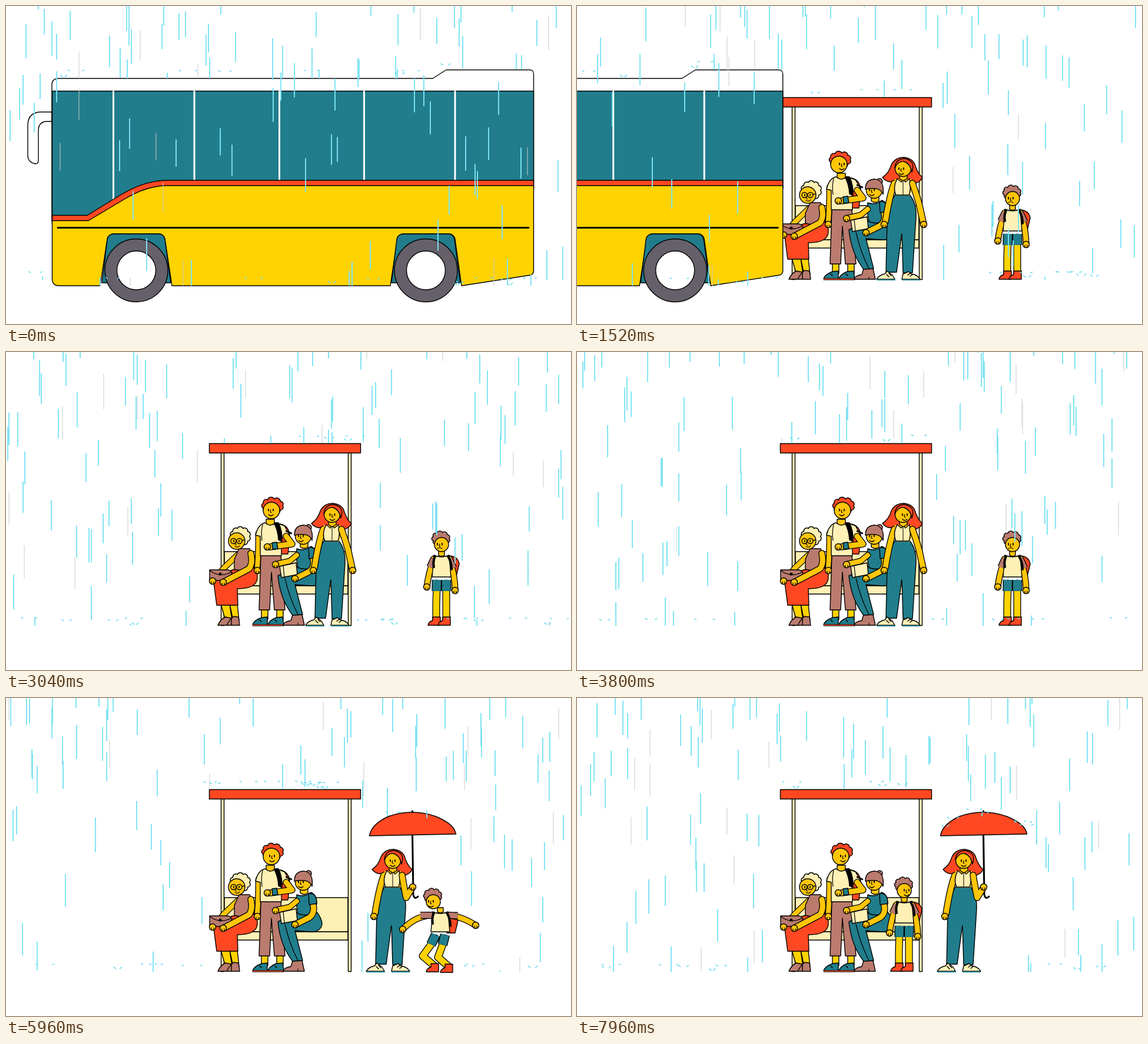
Write an HTML page that moves like this. It is 960x540 px and loops after 8 s.

```html
<!DOCTYPE html>
<html lang="en">
<head>
<meta charset="utf-8">
<title>Bus stop in the rain</title>
<style>
  html, body { margin: 0; width: 100%; height: 100%; overflow: hidden; background: #fff; }
  svg { display: block; width: 100%; height: 100%; }
</style>
</head>
<body>
<svg viewBox="0 0 960 540" stroke="#000" stroke-width="1.4" stroke-linejoin="round">
  <g id="shelter"></g>
  <g id="granny"></g>
  <g id="teen"></g>
  <g id="teenHead"></g>
  <g id="reader"></g>
  <g id="mother"></g>
  <g id="boy"></g>
  <g id="bus"></g>
  <g fill="none">
    <path id="thin" stroke="#c8cccd" stroke-width="1"/>
    <path id="drops" stroke="#7de3f4" stroke-width="1.9"/>
    <path id="splashes" stroke="#62d9ed" stroke-width="1.4"/>
  </g>
</svg>
<script>
const RED = '#ff4822', TEAL = '#217d8c', YELLOW = '#ffd300', SKIN = '#ffc608',
      CREAM = '#fff0b5', MAUVE = '#ba7b6e', GREY = '#65606a';
const $ = id => document.getElementById(id);
const LOOP = 8000;

// ---------- drawing helpers ----------
const shape = (d, fill = 'none', extra = '') => `<path d="${d}" fill="${fill}" ${extra}/>`;
const line = (d, width = 1.5, color = '#000') =>
  shape(d, 'none', `stroke="${color}" stroke-width="${width}" stroke-linecap="round"`);
const disc = (x, y, r, fill) => `<circle cx="${x}" cy="${y}" r="${r}" fill="${fill}"/>`;
const box = (x, y, w, h, fill) => shape(`M${x} ${y}h${w}v${h}h${-w}z`, fill);
const group = (transform, content) => `<g transform="${transform}">${content}</g>`;

const limb = (d, width, color, cap = 'round') => [[width + 2.6, '#000'], [width, color]]
  .map(([w, c]) => shape(d, 'none', `stroke="${c}" stroke-width="${w}" stroke-linecap="${cap}"`)).join('');
const hand = (x, y) => disc(x, y, 5.5, SKIN) + line(`M${x - 2} ${y + 1}v4m4 -4v4`, 1.2);

function curls(cx, cy, rx, ry, n, fill) {
  const at = i => {
    const a = i / n * 2 * Math.PI;
    return [cx + rx * Math.cos(a), cy + ry * Math.sin(a)];
  };
  let d = 'M' + at(0);
  for (let i = 1; i <= n; i++) {
    const [x, y] = at(i), [px, py] = at(i - 1);
    const r = Math.hypot(x - px, y - py) * .54;
    d += `A${r} ${r} 0 0 1 ${x} ${y}`;
  }
  return shape(d + 'Z', fill);
}

function face(x, y, look, mouth) {
  const f = x + look;
  return line(`M${f - 4} ${y - 3}v2.5m8 -2.5v2.5`, 1.8) +
    line(`M${f} ${y - 2}q-2 5 1 4.500M${f - 4} ${y + 6}q4 ${mouth} 8 0`, 1.2);
}

// ---------- timing helpers ----------
const ease = (t, from, to) => {
  const p = Math.min(1, Math.max(0, (t - from) / (to - from)));
  return p * p * (3 - 2 * p);
};
const mix = (a, b, p) => a + (b - a) * p;
const random = n => {
  const v = Math.sin(n * 127.1 + 11.7) * 43758.5453;
  return v - Math.floor(v);
};

// ---------- still parts ----------
$('shelter').innerHTML =
  box(371, 339, 210, 58, CREAM) + box(371, 397, 210, 14, CREAM) +
  box(365.5, 171, 5, 293.5, CREAM) + box(581.5, 171, 5, 293.5, CREAM) +
  box(345.5, 155.5, 257, 16, RED);

$('granny').innerHTML =
  shape('M365 428L373 456H384L380 428ZM380 428L386 456H396L393 428Z', YELLOW) +
  shape('M360 464Q364 454 373 450L383 452V464ZM375 464Q380 454 387 449L395 450L397 464Z', MAUVE) +
  limb('M394 344L370 367L352 389', 8, SKIN) +
  shape('M385 370Q352 380 353 392L358 430H394L393 402Q426 402 427 384Q428 370 420 366Z', RED) +
  shape('M396 334L388 352L388 369Q402 374 422 365Q423 350 414 334Z', MAUVE) +
  shape('M346 370H378L384 374Q381 388 362 388L346 387Z', MAUVE) +
  line('M346 371Q364 384 382 374', 1.2) + disc(364, 377, 1.8, '#000') +
  limb('M416 342Q420 358 413 368L371 390', 9, SKIN) + hand(369, 391) + hand(351, 389) +
  curls(398, 313, 15.5, 14, 10, CREAM) + disc(392, 321, 14, SKIN) +
  shape('M391 321a4.500 4.500 0 1 1 -9 0a4.500 4.500 0 1 1 9 0M401 321a4.500 4.500 0 1 1 -9 0a4.500 4.500 0 1 1 9 0M401 320L405 319') +
  line('M387 320v2M396 320v2', 1.8) + line('M391 323q-3 5 1 5M389 330q5 3 8 -1', 1.2);

$('teen').innerHTML =
  shape('M466 292Q483 296 482 316L479 343H464Z', RED) +
  box(434, 436, 11, 18, YELLOW) + box(460, 436, 11, 18, YELLOW) +
  shape('M433 345H467L474 438H456L451 374L448 438H430Z', MAUVE) +
  shape('M419 463Q421 456 434 451L444 450V463ZM445 463Q447 456 459 451L470 450L472 463Z', TEAL) +
  line('M420 464H472', 2, RED) + line('M419 465H472', 1) +
  line('M431 455l3 3m23 -3l3 3', 1.5) +
  limb('M429 308Q429 340 427 365', 8, SKIN) + hand(427, 371) +
  shape('M440 290Q449 297 459 290L473 295L481 309L468 316V346H432V313L424 311Q428 293 440 290Z', CREAM) +
  shape('M455 290L463 290Q470 304 469 322L463 319Q462 302 455 290Z', '#000') +
  line('M436 293Q433 306 435 320', 1.2) + line('M476 304l9 4', 2.5) +
  limb('M476 313L486 326L449 331', 9, SKIN) +
  shape('M452 324L460 323L462 334L453 335Z', TEAL) + hand(444, 331) +
  shape('M442 284H456V291Q449 297 442 291Z', SKIN);

$('reader').innerHTML =
  shape('M471 464Q472 458 484 456L487 446H503L507 464Z', MAUVE) + line('M496 464v-4', 1.2) +
  shape('M497 363L526 361Q537 374 537 384Q535 397 518 397L491 395L504 446L487 447Q466 420 462 380Z', TEAL) +
  line('M474 384Q481 416 496 446', 1.2) +
  shape('M494 334Q506 339 518 330Q528 334 528 348L525 364Q510 372 496 366L493 348Z', TEAL) +
  limb('M494 345L482 355L460 360', 8, SKIN) + hand(458, 361) +
  shape('M465 364L493 358L495 378L468 383Z', CREAM) + line('M471 363l2 19', 1.2) +
  limb('M522 352Q525 366 515 373L493 384', 9, SKIN) + hand(491, 385) +
  shape('M514 332Q528 330 528 349L515 351Z', TEAL) +
  shape('M500 324H513V331Q506 336 500 331Z', SKIN) +
  disc(514, 298, 5, MAUVE) + disc(505, 313, 13.5, SKIN) +
  shape('M490 311Q490 295 505 294Q523 295 520 320Q516 306 490 311Z', MAUVE) +
  face(506, 314, -5, 4);

const wheel = shape('M163 470L172 396Q174 387 184 387H259Q268 387 270 396L280 470Z', TEAL) +
  disc(221.5, 449, 53.5, GREY) + disc(221.5, 449, 33, '#fff');
$('bus').innerHTML =
  shape('M78 180H60Q37 180 37 203V255Q38 266 50 268Q55 268 55 262V212Q55 196 70 196H78Z', '#fff') +
  shape('M78 366V134Q78 123 90 123H725L748 108.500H889Q896.500 108 896.500 116V310Z', '#fff') +
  shape('M78.500 144.500H896.500V300H270L140 360H78.500Z', TEAL) +
  line('M182.500 145V328M320 145V296M464.500 145V296M608.500 145V296M763 145V296', 3, '#fff') +
  shape('M78.500 355.500H138L196 320Q234 297 272 296H896.500V310L140 370H78.500Z', RED) +
  shape('M78.500 364.500H140L203 327Q238 306 272 305H896.500V450Q896 456 891 457L774 475' +
    'L763 396Q761 387 752 387H676Q667 387 665 396L653 475H282L270 396Q268 387 259 387' +
    'H184Q174 387 172 396L160 475H90Q78.500 475 78.500 463Z', YELLOW) +
  line('M88 376.500H888', 2.8) + wheel + group('translate(492 0)', wheel);

// ---------- moving people ----------
function drawTeenHead(t) {
  const turn = ease(t, 1600, 2200), back = ease(t, 7000, 7500);
  const look = 5 - 6 * turn + 2 * ease(t, 4800, 5400) + 3 * back;
  return group(`translate(${-6 + 6 * turn - 3 * back} 0)`,
    curls(453, 261, 17, 11.5, 9, RED) + disc(451, 269, 14, SKIN) + face(451, 270, look, 4));
}

function drawUmbrella(t) {
  const open = mix(.08, 1.04, ease(t, 4350, 4650)) - .04 * ease(t, 4720, 5000);
  return line('M690.500 192V230L692 334Q694 343 700 337', 3) +
    group(`translate(691 0) scale(${open} 1) translate(-691 0)`,
      shape('M617.500 234Q621 214 650 201Q690 187 730 201Q762 214 764.500 231Z', RED));
}

function drawMother(t) {
  const walk = ease(t, 3850, 4600), raise = ease(t, 4050, 4400);
  const swing = 13 * Math.sin(walk * 4 * Math.PI);
  const look = -3 + 6 * ease(t, 2600, 3400) - 3 * ease(t, 4800, 5400);
  const handX = mix(589, 588, raise), handY = mix(371, 321, raise);
  const leftLeg = shape('M541 320Q529 336 527 364L525 452H543L552 385', TEAL) +
    shape('M509 464Q513 457 523 455L527 450L536 457L540 464Z', CREAM);
  const rightLeg = shape('M565 320Q577 335 576 358L570 453H554L552 385', TEAL) +
    shape('M583 464Q578 456 568 455L563 451L554 455L552 464Z', CREAM);
  return group(`translate(${103 * walk} ${-Math.abs(swing) * .15})`,
    group(`rotate(${swing} 552 345)`, leftLeg + line('M510 465H540', 2, TEAL) + line('M526 456l4 4m0 -6l4 4')) +
    group(`rotate(${-swing} 552 345)`, rightLeg + line('M553 465H582', 2, TEAL) + line('M562 457l4 -3m0 5l4 -3')) +
    shape('M541.500 320H565L568 345L552 388L540 345Z', TEAL, 'stroke="none"') +
    shape('M519 291Q530 284 534 270Q540 257 556 257Q572 259 575 272Q580 286 587 291Q584 299 572 302L540 297Q528 302 519 291Z', RED) +
    limb('M539 301Q531 322 524 366', 9, SKIN) + hand(522, 371) +
    shape('M540 294H568V308Q570 314 565 322H543Q536 310 540 294Z', SKIN, 'stroke="none"') +
    shape('M544 293L551 299L554 294L558 299L565 293Q568 312 564 321H542Q536 309 544 293Z', CREAM) +
    line('M554 296V320', 1) +
    (raise > .3 ? group('translate(-103 0)', drawUmbrella(t)) : '') +
    limb(`M570 301Q${mix(576, 574, raise)} ${mix(318, 325, raise)} ${mix(581, 577, raise)} ${mix(335, 339, raise)}L${handX} ${handY}`, 9, SKIN) +
    hand(handX, handY) +
    shape('M548 288H561V293L554 297L548 293Z', SKIN) + disc(554, 276, 13.5, SKIN) +
    shape('M540 275Q546 263 555 264Q566 267 569 282Q576 262 556 259Q541 260 540 275Z', RED) +
    face(554, 278, look, 4));
}

// neck, head, hip, elbow + hand (left, right), knee + foot (left, right), look, mouth
const STAND = [740,345, 740,327, 740,393, 718,375, 715,399, 763,378, 763,405, 731,430, 731,458, 748,430, 748,458, -3,-3];
const GLAD = [...STAND.slice(0, 22), -4, 4];
const CROUCH = [738,363, 726,346, 738,408, 697,369, 674,393, 773,370, 798,386, 708,438, 728,459, 734,440, 752,460, -4,4];
const LEAP = [740,340, 738,321, 740,390, 705,345, 690,318, 775,345, 790,318, 722,412, 735,440, 745,415, 758,440, -2,5];
const ARRIVED = [...STAND.slice(0, 22), 4, 4];
const BOY_KEYS = [[0, STAND], [4850, STAND], [5200, GLAD], [5500, GLAD], [5900, CROUCH], [6080, CROUCH],
  [6380, LEAP], [6740, CROUCH], [7150, ARRIVED], [LOOP, ARRIVED]];

function boyPose(t) {
  const i = BOY_KEYS.findIndex(([time]) => time > t);
  const [from, a] = BOY_KEYS[i - 1], [to, b] = BOY_KEYS[i];
  const p = ease(t, from, to);
  return a.map((v, k) => mix(v, b[k], p));
}

function drawBoy(t) {
  const [nx, ny, hx, hy, px, py, elx, ely, hlx, hly, erx, ery, hrx, hry,
    klx, kly, flx, fly, krx, kry, frx, fry, look, mouth] = boyPose(t);
  const hop = Math.min(1, Math.max(0, (t - 6080) / 660));
  const arm = (side, ex, ey, x, y) => {
    const sx = nx + 13 * side, sy = ny + 6;
    return limb(`M${sx} ${sy}Q${ex} ${ey} ${x} ${y}`, 8.5, SKIN) + hand(x, y) +
      limb(`M${sx} ${sy}L${mix(sx, ex, .75)} ${mix(sy, ey, .6)}`, 9.5, MAUVE, 'butt');
  };
  const leg = (side, kx, ky, x, y) => {
    const sx = px + 8 * side;
    return limb(`M${sx} ${py}L${kx} ${ky}L${x} ${y - 4}`, 10.5, YELLOW) +
      shape(`M${x - 6} ${y - 8}h13v14h-21q1 -6 8 -8z`, RED) +
      limb(`M${sx} ${py - 6}L${mix(sx, kx, .35)} ${mix(py, ky, .35)}`, 14, TEAL, 'butt');
  };
  return group(`translate(${-184 * ease(hop, 0, 1)} ${-50 * 4 * hop * (1 - hop)})`,
    shape(`M${nx + 10} ${ny + 1}q18 0 20 14l-5 21h-14z`, RED) +
    leg(-1, klx, kly, flx, fly) + leg(1, krx, kry, frx, fry) +
    arm(-1, elx, ely, hlx, hly) + arm(1, erx, ery, hrx, hry) +
    shape(`M${nx - 13} ${ny}Q${nx} ${ny + 6} ${nx + 13} ${ny}L${px + 16} ${py - 11}H${px - 16}Z`, CREAM) +
    line(`M${nx - 11} ${ny + 2}q-4 9 -2 18M${nx + 11} ${ny + 2}q6 9 6 22`, 4) +
    shape(`M${nx - 5} ${ny - 7}h10v7q-5 4 -10 0z`, SKIN) +
    curls(hx - 1, hy - 10, 14, 10.5, 9, MAUVE) + disc(hx, hy, 12, SKIN) + face(hx, hy + 1, look, mouth));
}

// ---------- rain ----------
const busShift = t => Math.max(-1000, -546 * (Math.max(0, t - 100) / 1420) ** 2);

function floorAt(x, t, chance) {
  const onBus = x - busShift(t);
  if (onBus > 78 && onBus < 896) return chance < .4 ? (onBus > 740 ? 108 : 123) : 475;
  if (x > 345 && x < 604) return 155;
  if (t > 4600 && x > 617 && x < 765) return 201 + ((x - 691) / 74) ** 2 * 28;
  return 465;
}

function drawRain(t) {
  let drops = '', thin = '', splashes = '';
  for (let i = 0; i < 165; i++) {
    const clock = t / 1000 + random(i);
    const age = clock % 1;
    const seed = i * 8 + Math.floor(clock) % 8;
    const x = Math.round(random(seed + 5000) * 952);
    const length = 42 + 18 * random(seed + 9000);
    const floor = floorAt(x, t, random(seed + 3000));
    const y = 420 * age + 380 * age * age;
    const top = y - length;
    if (top < floor) {
      const d = `M${x} ${top}V${Math.min(y, floor)}`;
      if (i % 8) drops += d; else thin += d;
    } else if (top < floor + 130 && i % 3) {
      const k = (top - floor) / 130, spread = 1 + 13 * k;
      const rise = floor - 1 - 12 * Math.sin(k * 2.2), tilt = 4 * (1 - k);
      splashes += `M${x - spread} ${rise}l-4 ${-tilt}M${x + spread} ${rise}l4 ${-tilt}`;
    }
  }
  $('drops').setAttribute('d', drops);
  $('thin').setAttribute('d', thin);
  $('splashes').setAttribute('d', splashes);
}

function frame(now) {
  const t = now % LOOP;
  $('teenHead').innerHTML = drawTeenHead(t);
  $('mother').innerHTML = drawMother(t);
  $('boy').innerHTML = drawBoy(t);
  $('bus').setAttribute('transform', `translate(${busShift(t)} 0)`);
  drawRain(t);
  requestAnimationFrame(() => frame(performance.now() - start));
}
const start = performance.now();
frame(0);
</script>
</body>
</html>
```
